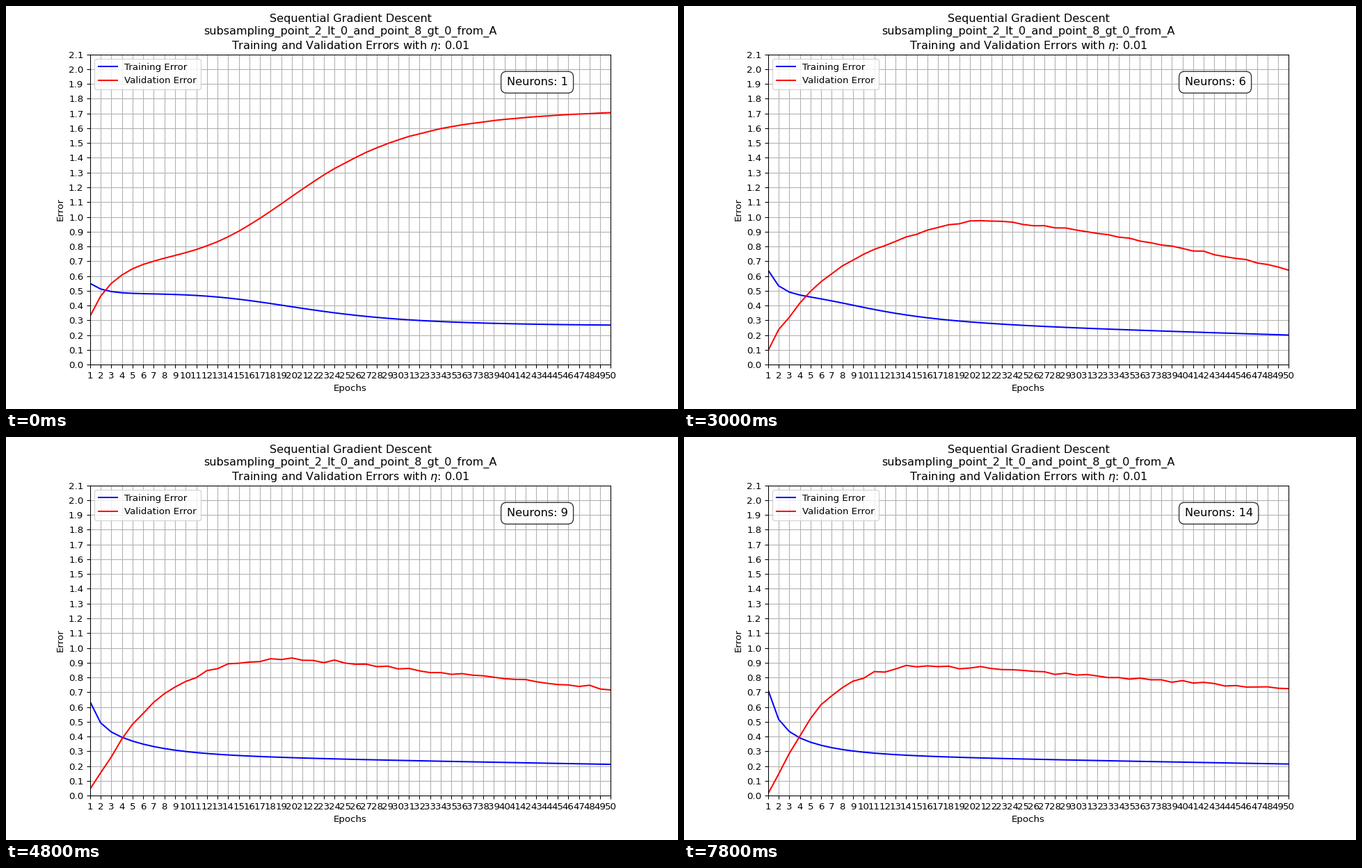
A matplotlib script for the animation above (8000 ms loop, 966 by 580 pixels).

```python
import numpy as np
import matplotlib.pyplot as plt
from matplotlib.animation import FuncAnimation

STEP_MS = 200
TICKS_PER_MODEL = 3   # each network size stays for 600 ms
FRAMES = 40
EPOCHS = np.arange(1, 51)
SIZES = [1, 3, 6, 8, 10, 14]   # neuron counts where the key values below apply


def key(n, values, sizes=SIZES):
    return np.interp(n, sizes, values)


def learned(n):
    """Share of the slow feature that has been learned, from 0 to 1."""
    center = key(n, [22, 14.8, 11.5, 5.2, 6.2, 5.1])
    power = max(2.2, 4.4 - 0.25 * n)
    odds = (EPOCHS / center) ** power
    return odds / (1 + odds)


def training(n):
    """A short spike, then a plateau that drops to a gentle slope."""
    floor = key(n, [.261, .348, .268, .273], [2, 3, 8, 10])
    slope = key(n, [0, .0033, .0012], [2, 3, 8])
    drop = key(n, [.219, .135, .18], [2, 3, 6])
    spike = key(n, [.07, .2, .165, .27], [1, 8, 12, 14])
    fade = max(.32, .48 - .02 * n)
    return (floor - slope * EPOCHS + drop * (1 - learned(n))
            + spike * fade ** (EPOCHS - 1))


def validation(n):
    """A saturating rise, a late fall and a little jitter."""
    height = key(n, [.41, 1.15, 1, .92, .88], [1, 3, 6, 8, 10])
    pace = key(n, [2.6, 8.7, 8.5, 5.1, 6.4, 4.5])
    bend = key(n, [.95, .9, 1.17], [1, 6, 8])
    rise = height * (1 - np.exp(-((EPOCHS - 1) / pace) ** bend))
    late_rise = key(n, [1, 0], [1, 3]) * learned(n)

    turn = 25 - 0.65 * n
    depth = key(n, [0, .64, .44, .27, .175], [1, 3, 6, 8, 10])
    progress = np.maximum(0, EPOCHS - turn) / (50 - turn)
    fall = depth * progress ** max(1, 2 - n / 6)

    jitter = np.random.default_rng(n).normal(0, .006 * min(1, n / 8), 50)
    jitter[0] = 0
    return .42 * np.exp(-n / 4) + rise + late_rise - fall + jitter


# 966 x 580 px; the tiny excess guards against rounding down
fig, ax = plt.subplots(figsize=(10, 6.0042), dpi=96.6)
train_line, = ax.plot([], [], color="blue", label="Training Error")
valid_line, = ax.plot([], [], color="red", label="Validation Error")
ax.set_title("Sequential Gradient Descent\n"
             "subsampling_point_2_lt_0_and_point_8_gt_0_from_A\n"
             r"Training and Validation Errors with $\eta$: 0.01")
ax.set_xlabel("Epochs")
ax.set_ylabel("Error")
ax.set_xlim(1, 50)
ax.set_ylim(0, 2.1)
ax.set_xticks(EPOCHS)
ax.set_yticks(np.arange(22) / 10)
ax.grid(True)
ax.legend(loc="upper left")
label = ax.text(0.8, 0.9, "", transform=ax.transAxes, fontsize=12,
                bbox=dict(boxstyle="round,pad=0.5", facecolor="white", alpha=0.8))


def update(frame):
    n = frame // TICKS_PER_MODEL + 1
    train_line.set_data(EPOCHS, training(n))
    valid_line.set_data(EPOCHS, validation(n))
    label.set_text(f"Neurons: {n}")
    return train_line, valid_line, label


anim = FuncAnimation(fig, update, frames=FRAMES, interval=STEP_MS,
                     repeat=True, repeat_delay=0)
plt.show()
```
